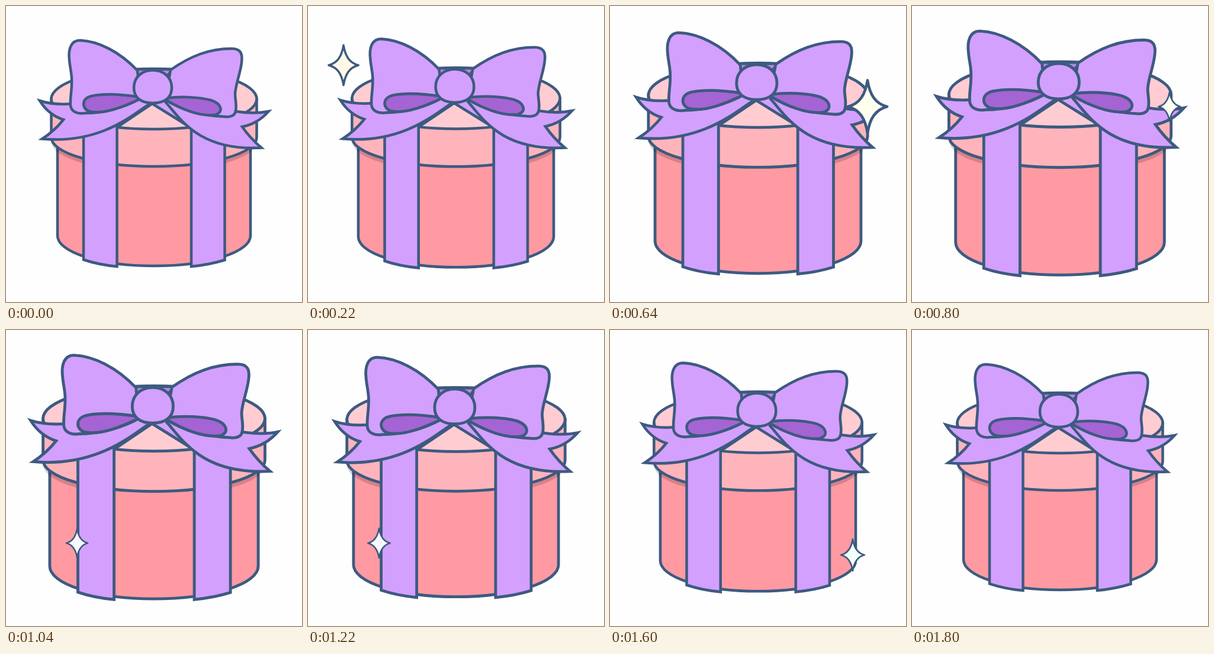
An HTML page with a canvas for the animation above (1820 ms loop, 500 px wide and 500 px high).

```html
<!DOCTYPE html>
<html lang="en">
<head>
<meta charset="utf-8">
<title>Gift box</title>
<style>
html, body { margin: 0; width: 100%; height: 100%; overflow: hidden; background: #fefefe; }
canvas { display: block; width: 100vw; height: 100vh; }
</style>
</head>
<body>
<canvas id="stage" width="500" height="500"></canvas>
<script>
const ctx = document.getElementById('stage').getContext('2d');
const LOOP = 1820, STEP = 20;
const INK = '#3d5a80', LILAC = '#d3a0fd', PLUM = '#a564d3';

// Painted from back to front: [fill, path, line width]
const parts = [
  ['#ff9aa2', 'M87 200V388A163 51 0 0 0 413 388V200Z'],
  // shade below the lid, on both sides
  ['rgba(0,0,0,.16)', 'M77 222V230A173 49 0 0 0 160 272V222ZM423 222V230A173 49 0 0 1 340 272V222Z', 0],
  ['#ffb4bb', 'M76.5 157V222A173.5 49 0 0 0 423.5 222V157Z'],
  ['#ffccd2', 'M76.5 157A173.5 51 0 0 1 423.5 157A173.5 51 0 0 1 76.5 157Z'],
  // ribbon over the lid
  ['#bd85ea', 'M216 107H282L262 130H234Z'],
  [LILAC, 'M131 200L240 150L247 165L187.5 205V440Q156 437 131 428.5Z'],
  [LILAC, 'M369.5 202L256 150L247 165L313 206V440Q344 437 369.5 429Z'],
  // tails
  [LILAC, 'M57 160Q84 169 125 164L225 145L245 164C220 178 165 234 61 224.5Q82 211 97 192Q72 184 57 160Z'],
  [LILAC, 'M443.5 178Q420 183 388 178L275 145L270 163C292 186 322 245 431.5 239.5Q413 224 399 204Q425 199 443.5 178Z'],
  // loops
  [LILAC, 'M222 109C192 77 155 59 125 58C109 58 105 74 107 91C108 105 112 116 111 130C111 145 108 155 109 168C110 178 120 183 133 181C166 181 201 171 226 157Z'],
  [LILAC, 'M278 108C312 84 344 72 381 72C396 72 400 80 398 95C396 114 388 131 387 148C387 158 390 167 388 177C387 185 380 188 370 187C333 185 299 178 269 158Z'],
  [PLUM, 'M226 154C194 149 164 148 145 152C126 156 128 174 141 178C166 184 201 169 226 157Z'],
  [PLUM, 'M269 156C297 152 327 154 346 159C365 165 368 180 353 184C327 187 295 174 269 158Z'],
  [LILAC, 'M248 108.5C266 108.5 280 120 280 138C280 154 269 164 248 164C227 164 216 154 216 138C216 120 230 108.5 248 108.5Z']
].map(([fill, d, width = 4.5]) => ({ fill, width, path: new Path2D(d) }));

const sparkles = [
  { x: 60, y: 100, size: 30.5, start: 0, fill: '#fff8e7' },
  { x: 435, y: 170, size: 37, start: 400, fill: '#fffff0' },
  { x: 120, y: 360, size: 26, start: 850, fill: '#f8f8ff' },
  { x: 410, y: 380, size: 23.5, start: 1250, fill: '#f5fffa' }
];
const RISE = 300, FALL = 200;
const star = new Path2D('M0 -1.34C.12 -.6 .4 -.15 1 0C.4 .15 .12 .6 0 1.34C-.12 .6 -.4 .15 -1 0C-.4 -.15 -.12 -.6 0 -1.34Z');

const ease = p => p <= 0 ? 0 : p >= 1 ? 1 : p * p * (3 - 2 * p);

function drawGift(t) {
  const half = LOOP / 2;
  const s = 1 + .085 * ease(1 - Math.abs(t - half) / half);
  ctx.save();
  ctx.translate(250, 250);
  ctx.scale(s, s);
  ctx.translate(-250, -250);
  ctx.strokeStyle = INK;
  ctx.lineJoin = 'miter';
  for (const part of parts) {
    ctx.fillStyle = part.fill;
    ctx.fill(part.path);
    if (part.width) {
      ctx.lineWidth = part.width;
      ctx.stroke(part.path);
    }
  }
  ctx.restore();
}

function drawSparkle(t, { x, y, size, start, fill }) {
  const age = t - start;
  const grow = age < RISE ? ease(age / RISE) : ease((RISE + FALL - age) / FALL);
  if (!grow) return;
  ctx.save();
  ctx.translate(x, y);
  ctx.scale(size * grow, size * grow);
  ctx.fillStyle = fill;
  ctx.strokeStyle = INK;
  ctx.lineWidth = .14;
  ctx.lineJoin = 'round';
  ctx.fill(star);
  ctx.stroke(star);
  ctx.restore();
}

function frame() {
  const now = performance.now() % LOOP;
  const t = now - now % STEP;
  ctx.fillStyle = '#fefefe';
  ctx.fillRect(0, 0, 500, 500);
  drawGift(t);
  for (const sparkle of sparkles) drawSparkle(t, sparkle);
  requestAnimationFrame(frame);
}
frame();
</script>
</body>
</html>
```
